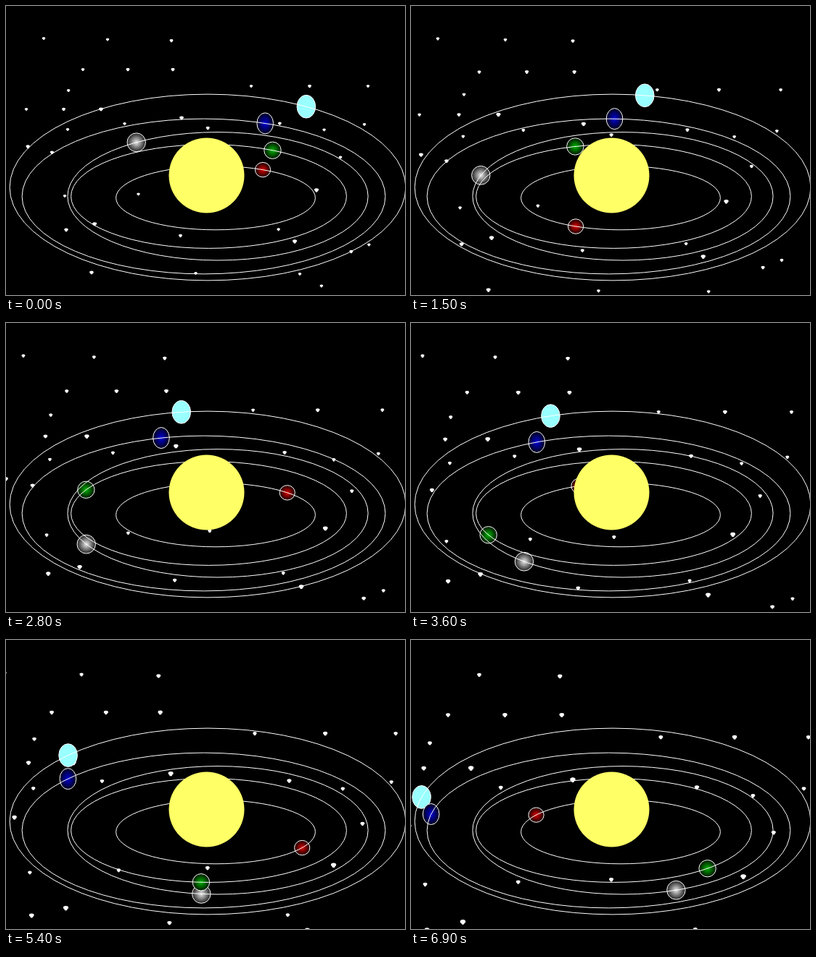
Write an HTML page with a canvas that moves like this. It is 550 px wide and 400 px high and loops after 7 s.

```html
<!DOCTYPE html>
<html lang="en">
<head>
<meta charset="utf-8">
<title>Orbits</title>
<style>
  html, body { margin: 0; width: 100%; height: 100%; overflow: hidden; background: #000; }
  canvas { display: block; }
</style>
</head>
<body>
<canvas id="stage" width="550" height="400"></canvas>
<script>
const ctx = document.getElementById('stage').getContext('2d');
const STEP_MS = 100, STEPS = 70, TAU = Math.PI * 2;

// start: arc length left of the orbit's top; speed: px per step;
// lap: steps after which a planet restarts its path.
function planet(orbit, size, core, rim, start, speed, lap = STEPS) {
  const [cx, cy, rx, ry] = orbit;
  return { cx, cy, rx, ry, size, core, rim, start, speed, lap };
}

const planets = [
  planet([278, 251, 272.9, 128.9], [12.8, 15.9], '#9ff', '#9ff', -137.3, 6.2),
  planet([272.5, 263.5, 250.4, 107.4], [11.3, 14.5], '#0000d8', '#000018', -85, 5.13),
  planet([292, 263.3, 207.1, 88.7], [12.7, 12.9], '#e8e8e8', '#222', 113.5, 6.43),
  planet([279.5, 263.5, 189.9, 71.9], [11.7, 11.7], '#00b400', '#001400', -88.5, 9.45),
  planet([289, 265.6, 137.4, 44.2], [10.6, 10.2], '#dc0000', '#180000', -65.3, 20.5, 30)
];

// Walks the orbit counter-clockwise from its top until the arc length is used up.
function alongOrbit({ cx, cy, rx, ry }, distance) {
  const slope = a => Math.hypot(rx * Math.cos(a), ry * Math.sin(a));
  const sign = Math.sign(distance), dt = TAU / 1440;
  let angle = 0, left = Math.abs(distance);
  while (left > 0) {
    const stride = slope(angle + dt / 2) * dt;
    angle += dt * Math.min(1, left / stride);
    left -= stride;
  }
  return [cx - sign * rx * Math.sin(angle), cy - ry * Math.cos(angle)];
}

function seeded(seed) {
  return () => (seed = (seed * 16807) % 2147483647) / 2147483647;
}

// Evenly spaced rows of three plus a loose scatter.
function makeStars() {
  const random = seeded(41);
  const rows = [
    [52, 45, 228, 48], [106, 88, 230, 88], [338, 111, 499, 111],
    [28, 143, 131, 143], [85, 171, 242, 155], [494, 164, 428, 255],
    [81, 263, 284, 258], [83, 310, 398, 326], [118, 369, 405, 371]
  ];
  const stars = rows.flatMap(([x0, y0, x1, y1]) =>
    [0, 0.5, 1].map(k => [x0 + (x1 - x0) * k, y0 + (y1 - y0) * k]));
  for (let i = 0; i < 11; i++) {
    stars.push([30 + random() * 480, 65 + random() * 330]);
  }
  return stars.map(([x, y]) => ({ x, y, size: 1 + 0.35 * random() ** 4 }));
}
const stars = makeStars();

function ellipse(x, y, rx, ry) {
  ctx.beginPath();
  ctx.ellipse(x, y, rx, ry, 0, 0, TAU);
}

// The star field spreads evenly away from a fixed point.
function drawStars(step) {
  const progress = step / (STEPS - 1);
  ctx.save();
  ctx.translate(314, 41);
  ctx.scale(1 + 0.264 * progress, 1 + 0.34 * progress);
  ctx.fillStyle = '#fff';
  for (const { x, y, size } of stars) {
    const px = x - 314, py = y - 41;
    ctx.beginPath();
    ctx.ellipse(px, py - 0.5 * size, 2.3 * size, 1.5 * size, 0, 0, TAU);
    ctx.ellipse(px, py + 0.6 * size, 1.4 * size, 1.4 * size, 0, 0, TAU);
    ctx.fill();
  }
  ctx.restore();
}

function drawPlanet(p, step) {
  const [x, y] = alongOrbit(p, p.start + p.speed * (step % p.lap));
  ctx.save();
  ctx.translate(x, y);
  ctx.scale(...p.size);
  const fill = ctx.createRadialGradient(0, 0, 0, 0, 0, 1);
  fill.addColorStop(0, p.core);
  fill.addColorStop(1, p.rim);
  ctx.fillStyle = fill;
  ellipse(0, 0, 1, 1);
  ctx.fill();
  ctx.restore();
  ctx.stroke();
}

function draw(step) {
  ctx.fillStyle = '#000';
  ctx.fillRect(0, 0, 550, 400);
  ctx.strokeStyle = '#fff';
  ctx.lineWidth = 1;
  drawStars(step);
  for (const p of planets) drawPlanet(p, step);
  for (const p of planets) {
    ellipse(p.cx, p.cy, p.rx, p.ry);
    ctx.stroke();
  }
  ctx.fillStyle = '#ff6';
  ellipse(276.5, 234.5, 52, 52);
  ctx.fill();
}

function tick() {
  draw(Math.floor(performance.now() / STEP_MS) % STEPS);
  requestAnimationFrame(tick);
}
tick();
</script>
</body>
</html>
```
